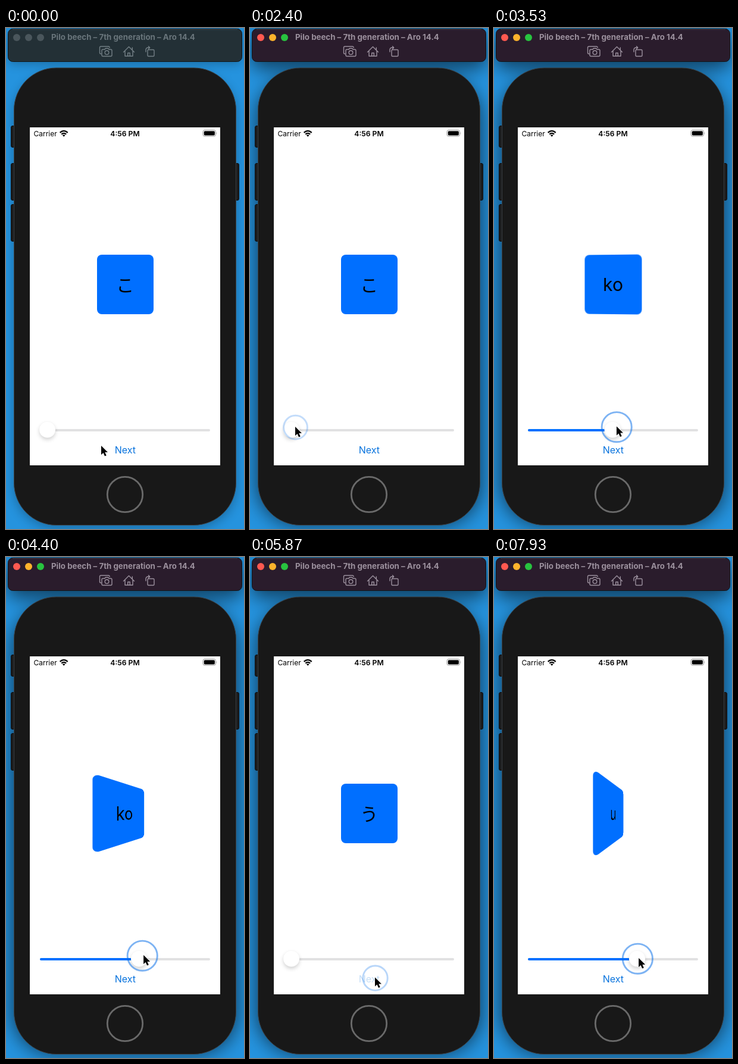
Animation of 400 by 842 pixels, one loop 8 s. Source, as an HTML page:

```html
<!DOCTYPE html>
<html lang="en">
<head>
<meta charset="utf-8">
<title>Flip card</title>
<style>
html, body { margin: 0; width: 100%; height: 100%; overflow: hidden; background: #2490da; }
#stage { position: absolute; left: 0; top: 0; width: 400px; height: 842px; overflow: hidden; }
svg { position: absolute; left: 0; top: 0; display: block; }
svg text { font-family: Inter, "Liberation Sans", sans-serif; }
.card {
  position: absolute; top: 381px; height: 100px; border-radius: 8px;
  background: #006fff; color: #000; text-align: center; white-space: nowrap;
}
#front { left: 153px; width: 94.5px; font: 30px/98px "Noto Sans CJK JP", "Noto Sans CJK", sans-serif; }
#back { font: 30px/100px Inter, "Liberation Sans", sans-serif; }
</style>
</head>
<body>
<div id="stage">
  <svg width="400" height="842" viewBox="0 0 400 842">
    <defs>
      <filter id="soft" x="-30%" y="-30%" width="160%" height="160%"><feGaussianBlur stdDeviation="9"/></filter>
      <filter id="wide" x="-30%" y="-100%" width="160%" height="300%"><feGaussianBlur stdDeviation="15"/></filter>
      <filter id="knobBlur" x="-50%" y="-50%" width="200%" height="200%"><feGaussianBlur stdDeviation="3.5"/></filter>
    </defs>
    <rect width="400" height="842" fill="#2593de"/>
    <g id="idleShade" filter="url(#soft)" opacity=".27">
      <rect x="13" y="76" width="374" height="764" rx="70"/>
      <rect x="4" y="6" width="392" height="54" rx="8"/>
    </g>
    <g id="activeShade" filter="url(#wide)" opacity=".55">
      <rect x="10" y="82" width="380" height="754" rx="70"/>
      <rect x="4" y="12" width="392" height="56" rx="8"/>
    </g>

    <!-- window bar -->
    <rect id="bar" x="3.5" y="1.5" width="393" height="55" rx="8" stroke="#10161a"/>
    <path d="M11 2.3H389" stroke="#fff" stroke-opacity=".22" stroke-width=".8"/>
    <circle class="lamp" cx="18" cy="16" r="6"/>
    <circle class="lamp" cx="38" cy="16" r="6"/>
    <circle class="lamp" cx="58" cy="16" r="6"/>
    <text id="title" x="76" y="20.3" font-size="13.3" font-weight="700">Pilo beech – 7th generation – Aro 14.4</text>
    <g id="icons" fill="none" stroke-width="1.4" stroke-linejoin="round" stroke-linecap="round">
      <path d="M160 43.5H159.500Q157.500 43.500 157.500 41.500V33Q157.500 31 159.500 31H172Q174 31 174.200 33"/>
      <path d="M163 36H166L167.300 34.300H171.700L173 36H176Q178 36 178 38V45.500Q178 47.500 176 47.500H163Q161 47.500 161 45.500V38Q161 36 163 36Z"/>
      <circle cx="169.500" cy="41.300" r="3.300"/>
      <path d="M197.500 40.500L206.500 31.500L215.500 40.500M200 38.500V47.300H213V38.500M212.300 33V36.500M204.700 47V42H208.300V47"/>
      <rect x="238" y="36.500" width="11" height="11" rx="1.500"/>
      <path d="M235 40V37Q235 33 239 33H241.500M239.500 30.800L241.700 33L239.500 35.200"/>
    </g>

    <!-- phone -->
    <g fill="#1c1c1d" stroke="#0c0d0f">
      <rect x="8.500" y="164.500" width="9" height="36" rx="2.500"/>
      <rect x="8.500" y="227.500" width="9" height="62" rx="2.500"/>
      <rect x="8.500" y="296.500" width="9" height="62" rx="2.500"/>
      <rect x="382.500" y="227.500" width="9" height="62" rx="2.500"/>
    </g>
    <rect x="13.500" y="67" width="373" height="768.500" rx="71" fill="#181818" stroke="#3b4044"/>
    <circle cx="200" cy="784" r="29.700" fill="none" stroke="#6a6a6a" stroke-width="2.800"/>
    <rect x="40" y="167" width="320" height="568" fill="#fff"/>

    <!-- status bar -->
    <text x="46.500" y="181.500" font-size="12">Carrier</text>
    <text x="200" y="181.500" font-size="12.200" font-weight="600" text-anchor="middle">4:56 PM</text>
    <g fill="none" stroke="#000" stroke-width="2.300">
      <path d="M90.700 175.900Q97.200 169.800 103.700 175.900"/>
      <path d="M93.300 178.700Q97.200 175.100 101.100 178.700"/>
    </g>
    <path d="M94.900 180.300Q97.200 178.400 99.500 180.300L97.200 182.700Z"/>
    <rect x="331" y="171.500" width="21.500" height="10.500" rx="3" fill="none" stroke="#9a9a9a"/>
    <rect x="332.700" y="173.200" width="18.200" height="7.200" rx="1.600"/>
    <path d="M353.700 175Q355.300 176.800 353.700 178.700Z" fill="#9a9a9a"/>

    <!-- slider -->
    <rect x="57" y="674" width="286" height="4" rx="2" fill="#e1e1e2"/>
    <rect id="fill" x="57" y="674" height="4" rx="2" fill="#0070ff"/>
    <g id="knob">
      <circle cy="3.500" r="13" opacity=".2" filter="url(#knobBlur)"/>
      <circle r="13.700" fill="#fff" stroke="#000" stroke-opacity=".05" stroke-width=".6"/>
    </g>
    <text id="next" x="200.300" y="714.500" font-size="16" text-anchor="middle" fill="#0873dd">Next</text>
  </svg>

  <div id="front" class="card" lang="ja"></div>
  <div id="back" class="card"></div>

  <svg width="400" height="842" viewBox="0 0 400 842">
    <circle id="ring" fill="none" stroke="#0a70e8" stroke-width="2.900"/>
    <path id="cursor" d="M0 0V15.200L3.500 12L6 17.600L8.700 16.400L6.300 11H11Z"
      stroke="#fff" stroke-width="1.200" stroke-linejoin="round" paint-order="stroke"/>
  </svg>
</div>
<script>
const LOOP = 8000, ACTIVATE = 1530, NEXT = 5800, RAMP = 155;
const $ = id => document.getElementById(id);
const clamp = x => Math.max(0, Math.min(1, x));

// Rows are [time, value, ...]
const firstDrag = [[2450, 0], [2700, .12], [3000, .31], [3170, .411], [3400, .48], [3600, .5],
  [4070, .5], [4250, .53], [4400, .59], [4700, .8], [5000, 1]];
const secondDrag = [[6640, 0], [7070, .2], [7500, .43], [7930, .655], [8000, .685]];
const pointer = [[70, 160, 702], [600, 167, 640], [1000, 167, 640], [1430, 162.5, 589.5],
  [1700, 162.5, 589.5], [2130, 76, 670], [2450, 76, 670], [2700, 110, 670], [3000, 159.5, 669.5],
  [3170, 185, 669.5], [3400, 203, 669.5], [3600, 206.5, 669.5], [4070, 206.5, 669.5],
  [4250, 215, 669.5], [4400, 231, 669], [4700, 287, 669], [5000, 337, 670], [5100, 337, 670],
  [5480, 210, 706.5], [6050, 210, 706.5], [6440, 73, 672], [6640, 73, 672], [7070, 126, 672],
  [7500, 186, 673], [7930, 243, 674], [8000, 251, 674]];
const presses = [[1450, 1610], [2330, 5040], [5480, NEXT], [6480, 9000]];

// Monotone cubic through the rows, resting where the value rests
function curve(keys, t, col = 1) {
  const last = keys.length - 1;
  if (t <= keys[0][0]) return keys[0][col];
  if (t >= keys[last][0]) return keys[last][col];
  let i = 0;
  while (t >= keys[i + 1][0]) i++;
  const rate = j => (keys[j + 1][col] - keys[j][col]) / (keys[j + 1][0] - keys[j][0]);
  const slope = j => {
    if (j === 0) return 0;
    if (j === last) return rate(last - 1);
    const a = rate(j - 1), b = rate(j);
    return a * b > 0 ? 2 * a * b / (a + b) : 0;
  };
  const h = keys[i + 1][0] - keys[i][0], u = (t - keys[i][0]) / h, w = 1 - u;
  return w * w * (1 + 2 * u) * keys[i][col] + u * w * w * h * slope(i)
    + u * u * (3 - 2 * u) * keys[i + 1][col] - u * u * w * h * slope(i + 1);
}

function pressed(t) {
  return Math.max(...presses.map(([down, up]) =>
    Math.min(clamp((t - down) / RAMP), clamp(1 - (t - up) / RAMP))));
}

function drawWindow(active) {
  $('idleShade').style.display = active ? 'none' : '';
  $('activeShade').style.display = active ? '' : 'none';
  $('bar').setAttribute('fill', active ? '#2a1c2c' : '#233036');
  $('title').setAttribute('fill', active ? '#9b909d' : '#69757b');
  $('icons').setAttribute('stroke', active ? '#9b909d' : '#737f85');
  const lit = ['#ff5950', '#fdb32c', '#28c33f'];
  document.querySelectorAll('.lamp').forEach((lamp, i) =>
    lamp.setAttribute('fill', active ? lit[i] : '#4a565c'));
}

function drawCard(value, second) {
  const angle = value * 360;
  const showFront = Math.cos(angle * Math.PI / 180) >= 0;
  const front = $('front'), back = $('back');
  const width = second ? 81 : 96;
  front.textContent = second ? 'う' : 'こ';
  back.textContent = second ? 'u' : 'ko';
  back.style.width = width + 'px';
  back.style.left = 200.25 - width / 2 + 'px';
  front.style.display = showFront ? 'block' : 'none';
  back.style.display = showFront ? 'none' : 'block';
  front.style.transform = `perspective(100px) rotateY(${angle}deg)`;
  back.style.transform = `perspective(100px) rotateY(${angle - 180}deg)`;
}

function drawPointer(t) {
  const at = (time, col) => curve(pointer, time, col);
  const p = pressed(t), ring = $('ring');
  ring.setAttribute('cx', at(t - 18, 1) + .5);
  ring.setAttribute('cy', at(t - 18, 2) + 1.2);
  ring.setAttribute('r', 15.5 + 9.6 * p);
  ring.setAttribute('opacity', .53 * p);
  $('cursor').setAttribute('transform', `translate(${at(t, 1)} ${at(t, 2)})`);
}

function render(t) {
  const second = t >= NEXT;
  const value = curve(second ? secondDrag : firstDrag, t);
  const x = 69.5 + 261 * value;
  drawWindow(t >= ACTIVATE);
  drawCard(value, second);
  $('fill').setAttribute('width', Math.max(0, x - 60));
  $('knob').setAttribute('transform', `translate(${x} 675)`);
  const held = t >= 5480 && t < NEXT + 60;
  $('next').setAttribute('opacity', held ? .2 : t < 5480 ? 1 : clamp(.2 + .8 * (t - NEXT - 60) / 250));
  drawPointer(t);
}

const start = performance.now();
function tick() {
  render((performance.now() - start) % LOOP);
  requestAnimationFrame(tick);
}
tick();
</script>
</body>
</html>
```
